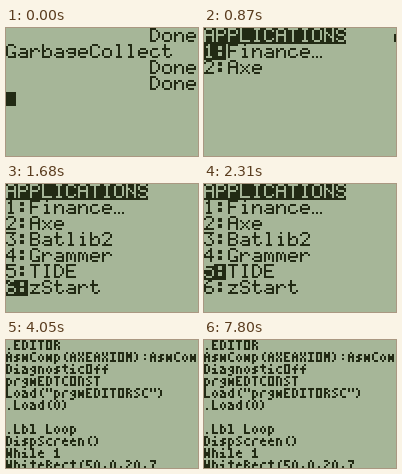
Animation of 192x128 px, one loop 8000 ms. Source, as an HTML page with a canvas:

```html
<!DOCTYPE html>
<html lang="en">
<head>
<meta charset="utf-8">
<title>Calculator screen</title>
<style>
  html, body { margin: 0; width: 192px; height: 128px; overflow: hidden; background: #a6b698; }
  canvas { display: block; }
</style>
</head>
<body>
<canvas id="lcd" width="192" height="128" role="img" aria-label="Calculator opening a program editor"></canvas>
<script>
const W = 96, H = 64, LOOP = 8000;
const LIGHT = '#a6b698', DARK = '#222a14';
const ctx = document.getElementById('lcd').getContext('2d');
const dots = new Uint8Array(W * H);

// Pen strokes for each letter: xy points joined by lines, strokes split by commas.
const BIG = {
  A: '06 01 10 30 41 46,03 43',
  B: '00 06 36 45 44 33 03,00 30 41 42 33',
  C: '41 30 10 01 05 16 36 45',
  D: '00 06 26 44 42 20 00',
  E: '40 00 06 46,03 33',
  F: '06 00 40,03 33',
  G: '41 30 10 01 05 16 46 44 34',
  I: '10 30,20 26,16 36',
  L: '00 06 46',
  N: '06 00,46 40,12 34',
  O: '01 05 16 36 45 41 30 10 01',
  P: '06 00 30 41 42 33 03',
  S: '41 30 10 01 02 13 33 44 45 36 16 05',
  T: '00 40,20 26',
  a: '12 32 43 46 16 05 14 44',
  b: '00 06 36 45 43 32 22 13',
  c: '32 12 03 05 16 36 45',
  e: '04 44 43 32 12 03 05 16 36',
  g: '16 36 45 42 12 03 14 44',
  i: '20,12 22 26,16 36',
  l: '10 20 26,16 36',
  m: '02 06,12,23 25,32,43 46',
  n: '02 06,13 22 32 43 46',
  o: '12 32 43 45 36 16 05 03 12',
  r: '02 06,13 22 32 43',
  t: '10 15 26 36 45,02 32',
  x: '02 46,42 06',
  z: '02 42 06 46',
  1: '11 20 26,16 36',
  2: '01 10 30 41 42 06 46',
  3: '00 40 22 44 45 36 16 05',
  4: '36 30 03 04 44',
  5: '40 00 02 32 43 45 36 16 05',
  6: '30 20 02 05 16 36 45 44 33 03',
  ':': '11 21 22 12,14 24 25 15',
  '…': '06,26,46'
};

const SMALL = {
  A: '04 01 10 21 24,02 22',
  C: '20 10 01 03 14 24',
  D: '00 04 14 23 21 10 00',
  E: '20 00 04 24,02 12',
  I: '00 20,10 14,04 24',
  L: '00 04 24',
  M: '04 00,24 20,01 21,02 22',
  N: '04 00 10 21 24',
  O: '00 04 24 20 00',
  R: '04 00 10 21 12 02,23 24',
  S: '20 10 01 12 23 14 04',
  T: '00 20,10 14',
  W: '00 04,20 24,02 22,03 23',
  X: '00 01 23 24,20 21 03 04',
  a: '01 11 22 24 04 03 12',
  b: '00 04 14 23 22 11 01',
  c: '21 11 02 03 14 24',
  d: '20 24 14 03 02 11 21',
  e: '11,02 22,03 14 24',
  f: '20 11 14,02 22',
  g: '21 11 02 13 23,21 24 15 05',
  h: '00 04,01 11 22 24',
  i: '10,02 12 14,04 24',
  l: '00 10 14,04 24',
  m: '01 04,21 24,02 22,03 23',
  n: '04 01 11 22 24',
  o: '11 02 03 14 23 22 11',
  p: '05 01 11 22 23 14 04',
  r: '04 02 11 21',
  s: '21 11 02 12,13 23 14 04',
  t: '10 13 24,01 21',
  0: '10 01 03 14 23 21 10',
  1: '01 10 14,04 24',
  2: '00 10 21 03 04 24',
  5: '20 00 02 12 23 14 04',
  7: '00 20 21 12 14',
  '(': '20 11 13 24',
  ')': '00 11 13 04',
  ':': '11,13',
  '.': '14',
  ',': '13 14 05',
  '"': '00 01,20 21'
};

const APPS = ['Finance…', 'Axe', 'Batlib2', 'Grammer', 'TIDE', 'zStart'];
const CODE = [
  '.EDITOR', 'AsmComp(AXEAXIOM):AsmCom', 'DiagnosticOff', 'prgmEDTCONST',
  'Load("prgmEDITORSC")', '.Load(0)', '', '.Lbl Loop', 'DispScreen()',
  'While 1', 'WhiteRect(50,0,20,7'
];

// Editor cursor: [time, column, row], or just [time] when hidden.
const CURSOR = [
  [2520], [2670, 0, 0], [2910], [3030, 0, 0], [3150], [3360, 0, 0], [3600],
  [3720, 1, 0], [3870, 2, 0], [3960, 3, 0], [4050], [6540, 5, 4], [6720]
];
const run = [6, 10, 11, 13, 15, 17, 19, 20].map(col => [col, 4]);
run.push([8, 5], [0, 6]);
run.forEach(([col, row], i) => CURSOR.push([6870 + i * 660 / 9, col, row]));
CURSOR.push([7800]);

function dot(x, y, v = 1) {
  if (x >= 0 && x < W && y >= 0 && y < H) dots[y * W + x] = v;
}

function box(x, y, w, h) {
  for (let j = 0; j < h; j++) for (let i = 0; i < w; i++) dot(x + i, y + j);
}

function line([x0, y0], [x1, y1], ox, oy, v) {
  const n = Math.max(Math.abs(x1 - x0), Math.abs(y1 - y0)) || 1;
  for (let i = 0; i <= n; i++) {
    dot(ox + Math.round(x0 + (x1 - x0) * i / n), oy + Math.round(y0 + (y1 - y0) * i / n), v);
  }
}

function write(str, x, y, font, step, v = 1) {
  [...str].forEach((ch, i) => {
    if (!font[ch]) return;
    for (const stroke of font[ch].split(',')) {
      const pts = stroke.split(' ').map(p => [+p[0], +p[1]]);
      pts.forEach((p, k) => line(pts[Math.max(0, k - 1)], p, x + i * step, y, v));
    }
  });
}

function big(str, col, row, inverse) {
  if (inverse) box(col * 6, row * 8, str.length * 6 - 1, 8);
  write(str, col * 6, row * 8, BIG, 6, inverse ? 0 : 1);
}

function home(t) {
  for (const row of [0, 2, 3]) big('Done', 12, row);
  big('GarbageCollect', 0, 1);
  if (t < 300) box(0, 32, 5, 7);
}

function menu(t) {
  const count = t < 870 ? 0 : t < 930 ? 2 : t < 990 ? 4 : 6;
  const pick = t < 1680 ? 0 : t < 1950 ? 5 : 4;
  big('APPLICATIONS', 0, 0, true);
  APPS.slice(0, count).forEach((name, i) => {
    big(i + 1 + ':', 0, i + 1, i === pick);
    big(name, 2, i + 1);
  });
}

function editor(t) {
  CODE.forEach((str, i) => write(str, 0, i * 6, SMALL, 4));
  const [, col, row] = CURSOR.filter(c => c[0] <= t + 0.01).pop();
  if (col === undefined) return;
  for (let j = 0; j < 6; j++) dots[(row * 6 + j) * W + col * 4] ^= 1;
}

function draw(t) {
  dots.fill(0);
  if (t < 810) home(t);
  else if (t < 2520) menu(t);
  else editor(t);

  const busy = [[750, 990], [1620, 1680], [2250, 2310]].some(([a, b]) => t >= a && t < b);
  if (busy) box(95, 3, 1, 4);

  ctx.fillStyle = LIGHT;
  ctx.fillRect(0, 0, 192, 128);
  ctx.fillStyle = DARK;
  dots.forEach((on, i) => {
    if (on) ctx.fillRect(i % W * 2, Math.floor(i / W) * 2, 2, 2);
  });
}

const start = performance.now();
function tick() {
  draw((performance.now() - start) % LOOP);
  requestAnimationFrame(tick);
}
tick();
</script>
</body>
</html>
```
